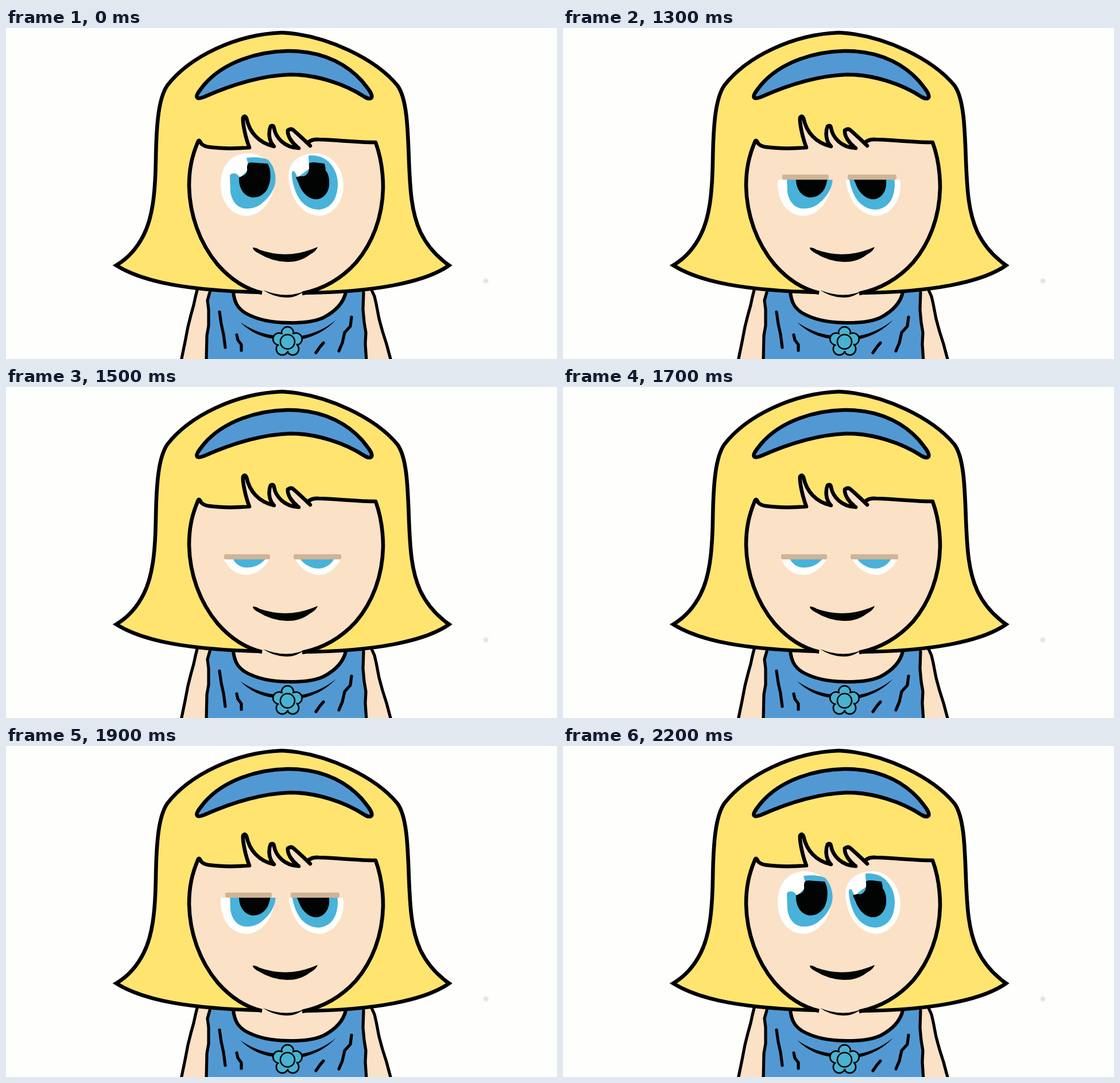
An HTML page that plays this animation: 960x576 px, repeating every 2.3 s.

```html
<!DOCTYPE html>
<html lang="en">
<head>
<meta charset="utf-8">
<title>Blinking girl</title>
<style>
  html, body { margin: 0; width: 100%; height: 100%; overflow: hidden; background: #fefefc; }
  svg { display: block; width: 960px; height: 576px; }
  .line { fill: none; stroke: #000; stroke-width: 6.6; stroke-linejoin: round; stroke-linecap: round; }
  .thin { stroke-width: 5.2; }
  .skin { fill: #fbe1c6; }
  .hair { fill: #ffe470; }
  .blue { fill: #5299d3; }
  .iris { fill: #48b2d9; }
  .white { fill: #fff; }
  .dark { fill: #020403; }
  .bar { fill: #cfb497; }
</style>
</head>
<body>
<svg viewBox="0 0 960 576">
  <defs>
    <radialGradient id="smudge">
      <stop offset="0.3" stop-color="#dbe3dd"/>
      <stop offset="1" stop-color="#fefefc"/>
    </radialGradient>
  </defs>
  <circle cx="836" cy="440" r="6" fill="url(#smudge)"/>

  <g id="body">
    <path class="skin" d="M334 450L327 480L318 520L305 580H671L656 530L645 480L638 450Z"/>
    <path class="blue" d="M355 450L352 490L353 520L349 580H627V530L621 490L622 450H592
      C588 478 574 493 553 504C535 512 515 513 495 513C465 513 438 508 417 496C401 486 399 474 396 450Z"/>
    <g class="line thin">
      <path d="M333 456L330 468L327 482L322 500L317 520L312 546L305 580"/>
      <path d="M637 456L642 467L645 480L650 506L656 528L663 550L671 580"/>
      <path d="M355 460L351 474L353 490L353 518L350 535L349 580"/>
      <path d="M623 460L622 490L624 512L627 530L626 550L628 580"/>
      <path stroke-width="6" d="M396 460C398 474 401 486 417 496C438 508 465 513 495 513C515 513 535 512 553 504C574 493 588 478 592 460"/>
      <path d="M372 494L375 515L379 533L382 556"/>
      <path d="M402 534L404 543L410 551V561"/>
      <path d="M602 503L600 519L590 530L586 548L580 562"/>
      <path d="M553 548L547 555L540 565"/>
    </g>
    <path class="dark" d="M408 512Q438 532 468 535V541Q433 537 408 512ZM575 508Q551 534 514 542V536Q548 530 575 508Z"/>
  </g>
  <g id="flower" fill="#48b2d0" stroke="#000" stroke-width="2.6"></g>

  <path class="hair line" style="fill:#ffe470;stroke-linejoin:miter;stroke-linecap:butt" d="M446 460C320 457 240 443 192 413
    C214 400 229 382 240 360C255 330 260 290 261 230C262 165 266 122 281 100C320 50 400 11 481 8
    C560 12 645 55 682 100C698 122 700 170 702 230C704 280 706 320 722 355C735 382 752 399 772 413
    C730 443 640 460 516 461"/>
  <path class="line" style="fill:#5299d3" d="M333 121C330 117 338 108 345 99C380 58 440 41 490 40
    C560 39 600 70 620 92C632 107 639 115 637 121Q634 125 625 120C590 97 540 81 495 81
    C440 83 390 100 345 120Q335 124 333 121Z"/>

  <path class="skin" id="face"/>
  <path class="line" id="outline" style="stroke-linecap:butt"/>
  <path class="dark" d="M448 456Q487 472 520 458Q504 470 487 469Q465 468 448 456Z"/>
  <path class="dark" d="M430 382Q436 382 442 386Q488 402 533 385L543 381Q541 388 530 394Q512 408 489 407Q462 406 440 392Q430 387 430 382Z"/>

  <g id="eyes">
    <path class="white" d="M420 218C450 217 468 240 468 268C466 300 445 327 418 327C390 326 374 300 374 272C374 242 390 219 420 218Z"/>
    <path class="iris" d="M419 226Q440 223 456 229C468 240 471 258 469 270C466 285 456 297 447 304
      C438 313 425 315 415 314C402 312 393 300 391 285L390 257Q392 251 402 254L408 260L424 245Z"/>
    <path class="dark" d="M420 244Q419 234 427 234L456 236C463 248 462 268 455 281C448 292 438 295 430 295
      C414 293 405 278 406 260Q411 258 415 256Q421 252 420 244Z"/>
    <path class="white" d="M540 218C568 219 588 245 588 275C588 305 567 327 545 327C518 325 504 305 497 285
      C492 270 491 255 494 245C500 227 518 218 540 218Z"/>
    <path class="iris" d="M527 222C548 220 563 230 570 243C578 255 580 272 576 288C572 305 560 315 545 316
      C528 316 514 305 507 290C500 275 498 262 498 252Q499 247 503 250L508 260L528 245Z"/>
    <path class="dark" d="M528 236Q530 233 540 234L555 236Q557 243 557 248C561 252 564 262 563 274
      C561 290 550 299 538 298C524 296 514 283 510 271L505 260Q512 257 519 258Q530 254 528 236Z"/>
  </g>

  <g id="lids">
    <rect class="skin" id="cover" x="371" y="215" width="221"/>
    <rect class="bar" height="9" rx="3"/>
    <rect class="bar" height="9" rx="3"/>
  </g>
</svg>
<script>
const $ = s => document.querySelector(s);

// Face: fringe from left to right, then cheeks down to the chin.
const fringe = `M334 199Q336 192 340 201Q345 206 353 207C375 210 400 210 424 208
  C417 190 412 165 413 156Q416 151 419 157C424 181 440 200 467 206
  C456 195 458 178 461 171Q466 168 467 174C470 191 485 208 510 209
  C498 200 490 188 491 178Q497 174 501 178C510 186 519 194 530 205L526 200
  Q532 193 545 194C580 195 610 199 644 199`;
const right = "C653 224 657 248 657 278C656 330 638 375 610 408C582 439 550 455 516 462";
const left = "M334 199C324 223 319 245 319 275C320 325 337 374 369 412C392 438 416 454 446 461";
$("#face").setAttribute("d", fringe + right + "Q487 472 446 461C416 454 392 438 369 412C337 374 320 325 319 275C319 245 324 223 334 199Z");
$("#outline").setAttribute("d", fringe + right + left);

// Five petals, covered in the middle so that only their rims show.
const disc = (x, y, r, extra = "") => `<circle cx="${x}" cy="${y}" r="${r}" ${extra}/>`;
let petals = "";
for (let i = 0; i < 5; i++) {
  const a = (i * 72 - 90) * Math.PI / 180;
  petals += disc(490.5 + 15.5 * Math.cos(a), 546 + 15.5 * Math.sin(a), 10.5);
}
$("#flower").innerHTML = petals + disc(490.5, 546, 16, 'stroke="none"') + disc(490.5, 546, 12.5);

// Lid positions: bar top, then left and right ends of both bars.
const lids = [
  [223, 392, 455, 502, 567],
  [238, 382, 459, 500, 579],
  [255, 382, 463, 496, 581],
  [273, 376, 466, 497, 589],
  [291, 380, 460, 501, 584],
  [316, 394, 446, 517, 570]
];
const LOOP = 2300, START = 1100, STEP = 100, CLOSED = lids.length - 1;
const bars = document.querySelectorAll(".bar");

function draw(time) {
  const step = Math.floor((time % LOOP - START) / STEP);
  const level = CLOSED - Math.abs(step - CLOSED);
  const lid = lids[level];
  $("#lids").style.display = lid ? "" : "none";
  if (!lid) return;
  const [y, ...ends] = lid;
  const bottom = level === CLOSED ? 329 : y + 9;
  $("#cover").setAttribute("height", bottom - 215);
  bars.forEach((bar, i) => {
    bar.setAttribute("x", ends[2 * i]);
    bar.setAttribute("y", y);
    bar.setAttribute("width", ends[2 * i + 1] - ends[2 * i]);
  });
}

const begin = performance.now();
function tick() {
  draw(performance.now() - begin);
  requestAnimationFrame(tick);
}
tick();
</script>
</body>
</html>
```
